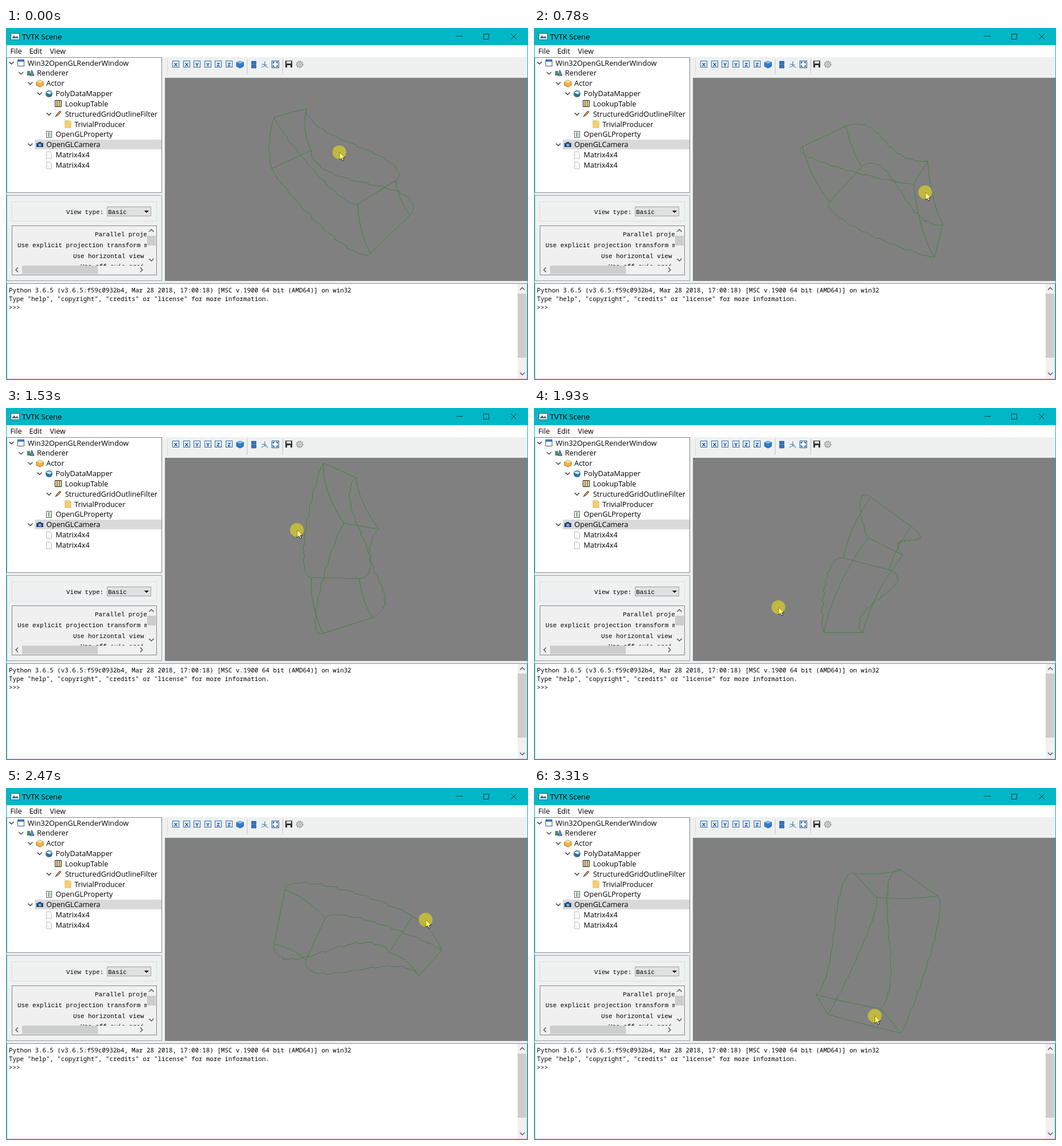
An HTML page that plays this animation: 910x615 px, repeating every 3390 ms.

```html
<!DOCTYPE html>
<html lang="en">
<head>
<meta charset="utf-8">
<title>TVTK Scene</title>
<style>
  html, body { margin: 0; width: 100%; height: 100%; overflow: hidden; background: #eff1f1; }
  svg { display: block; }
  text { font: 12.7px "Open Sans", "Noto Sans", sans-serif; white-space: pre; }
  .con { font: 10.82px "Noto Sans Mono", "DejaVu Sans Mono", monospace; }
  .form { font: 10.83px "Liberation Mono", monospace; }
  .line { fill: none; stroke: #333; }
  .arrow { fill: none; stroke: #505050; stroke-width: 1.4; }
</style>
</head>
<body>
<svg width="910" height="615" viewBox="0 0 910 615">
  <defs>
    <clipPath id="formClip"><rect x="11" y="346" width="234" height="69"/></clipPath>
    <clipPath id="viewClip"><rect x="277" y="87" width="632" height="355"/></clipPath>
  </defs>

  <!-- title bar and menu -->
  <rect width="910" height="615" fill="#eff1f1"/>
  <rect width="910" height="30" fill="#00b7c6"/>
  <rect x="8.5" y="9.5" width="15" height="11" fill="#e8f4fa" stroke="#555"/>
  <path d="M10 18l4-5 3 3 2-2 3 4z" fill="#3a6d86"/>
  <text x="28" y="19.5" style="font-size:13px">TVTK Scene</text>
  <path class="line" d="M785 14.5h11M832.5 10.5h9v9h-9zM880 10l10 10M890 10l-10 10"/>
  <rect y="30" width="910" height="21" fill="#fff"/>
  <text x="7.5" y="45">File</text><text x="40.5" y="45">Edit</text><text x="76.5" y="45">View</text>

  <!-- tree -->
  <rect x="1.5" y="51.5" width="270" height="236" fill="#fff" stroke="#828790"/>
  <rect x="50" y="195" width="221" height="17" fill="#d9d9d9"/>
  <g id="tree"></g>

  <!-- form -->
  <rect x="1.5" y="292.5" width="270" height="149" fill="none" stroke="#9a9ea4"/>
  <rect x="10.5" y="303.5" width="252" height="34" fill="none" stroke="#dcdfdf"/>
  <text class="form" x="105" y="325">View type:</text>
  <rect x="176.5" y="312.5" width="76" height="16" fill="#e1e1e1" stroke="#a0a0a0"/>
  <text class="form" x="178" y="325">Basic</text>
  <path d="M241 319h8l-4 4z"/>
  <rect x="10.5" y="345.5" width="252" height="86" fill="#f0f0f0" stroke="#828790"/>
  <g clip-path="url(#formClip)">
    <text class="form" x="155" y="364">Parallel projection</text>
    <text class="form" x="20" y="383">Use explicit projection transform matrix</text>
    <text class="form" x="117" y="402">Use horizontal view</text>
    <text class="form" x="130" y="420">Use off axis proj</text>
  </g>
  <rect x="246" y="363" width="15" height="17" fill="#cdcdcd"/>
  <rect x="28" y="415" width="132" height="15" fill="#cdcdcd"/>
  <path class="arrow" d="M249.5 356l4-4 4 4M249.5 403l4 4 4-4M21 418.5l-4 4 4 4M234 418.5l4 4-4 4"/>

  <!-- tool bar and scene -->
  <path d="M281.5 55v29" stroke="#b0b0b0" stroke-dasharray="1 2"/>
  <path d="M420.5 54v28M482.5 54v28" stroke="#c4c7c7"/>
  <g id="tools"></g>
  <path d="M402 60l6-2 6 2v7l-6 3-6-3z" fill="#2f7fd0" stroke="#1d4f8e"/>
  <path d="M402 60l6 2 6-2-6-2z" fill="#8cc2f2"/>
  <path d="M428 58h8v5h-8zM428 64h8v6h-8z" fill="#2f74c4" stroke="#1f4f8c" stroke-width=".7"/>
  <path fill="none" stroke="#3a6ea5" d="M451 58v8M451 66l-6 3M451 66l6 3M446 63l9 2"/>
  <rect x="463.5" y="57.5" width="12" height="12" fill="#fff" stroke="#1d4f80"/>
  <path d="M465 59h4l-4 4zM474 59v4l-4-4zM465 68v-4l4 4zM474 68h-4l4-4z" fill="#1d5f9c"/>
  <rect x="487" y="57" width="12" height="12" fill="#333"/>
  <path d="M489 58h8v4h-8zM490 65h6v4h-6z" fill="#e8e8e8"/>
  <circle cx="512" cy="63.5" r="5.3" fill="none" stroke="#999" stroke-width="2" stroke-dasharray="2.4 1.1"/>
  <circle cx="512" cy="63.5" r="4" fill="#eee" stroke="#999"/>
  <circle cx="512" cy="63.5" r="1.6" fill="none" stroke="#888"/>
  <rect x="277" y="87" width="632" height="355" fill="#808080"/>
  <g clip-path="url(#viewClip)">
    <path id="wire" fill="none" stroke="#457f45"/>
    <g id="cursor">
      <path d="M.5 0v13l3-2.8 2.2 5 2.3-1-2.2-4.8h4.2z" fill="#fff" stroke="#111" stroke-width=".9"/>
      <circle r="12" fill="#fff000" fill-opacity=".5"/>
    </g>
  </g>

  <!-- console -->
  <rect x="1.5" y="446.5" width="907" height="167" fill="#fff" stroke="#828790"/>
  <text class="con" x="5" y="461.5">Python 3.6.5 (v3.6.5:f59c0932b4, Mar 28 2018, 17:00:18) [MSC v.1900 64 bit (AMD64)] on win32</text>
  <text class="con" x="5" y="476.5">Type "help", "copyright", "credits" or "license" for more information.</text>
  <text class="con" x="5" y="491.5">&gt;&gt;&gt;</text>
  <rect x="892" y="447" width="16" height="166" fill="#f0f0f0"/>
  <rect x="892" y="464" width="15" height="112" fill="#cdcdcd"/>
  <path class="arrow" d="M896 457.5l4-4 4 4M896 602l4 4 4-4"/>
  <path d="M.5 30v584.5h909V30" fill="none" stroke="#00b7c6"/>
</svg>

<script>
const $ = id => document.getElementById(id);

// ---- tree ----
const icons = {
  window: '<path d="M-5.5-5.5h11v11h-11z" fill="#fff" stroke="#456"/><path d="M-5-5h10v3h-10z" fill="#3b8ad0"/>',
  render: '<path d="M-6-4h5v8h-5z" fill="#4d8a5b"/><path d="M-1 4l3-9 4 9z" fill="#5aa0dc" stroke="#235"/>',
  actor: '<path d="M-6-3l6-3 6 3v6l-6 3-6-3z" fill="#f0b445" stroke="#a9701c"/><path d="M-6-3l6 2 6-2-6-3z" fill="#fbe0a0"/>',
  mapper: '<circle r="6" fill="#2c6ea0"/><path d="M-5-2q5-5 10 0l-4 3z" fill="#cfe8f5"/>',
  table: '<path d="M-5.5-5.5h11v11h-11z" fill="#f6dfa0" stroke="#222"/><path d="M-2-5v10M2-5v10" stroke="#222"/>',
  filter: '<path d="M-5 5l3-5 5-5 2 2-5 5z" fill="#d9973a" stroke="#444"/>',
  folder: '<path d="M-5-6h7l3 2v10h-10z" fill="#f5cf73" stroke="#e0b04a"/>',
  prop: '<path d="M-4.5-5.5h9v11h-9z" fill="#fff" stroke="#555"/><path d="M-2-3h5M-2 0h5M-2 3h5M-1-3v6" stroke="#3b8a4a"/>',
  camera: '<path d="M-6-3h3l1-2h4l1 2h3v7h-12z" fill="#244a73"/><circle cy=".5" r="2.5" fill="#7fb2e0"/>',
  page: '<path d="M-4.5-6h6l3 3v9h-9z" fill="#fafafa" stroke="#bbb"/>'
};
// depth, label, icon, open
$('tree').innerHTML = [
  [0, 'Win32OpenGLRenderWindow', 'window', true], [1, 'Renderer', 'render', true],
  [2, 'Actor', 'actor', true], [3, 'PolyDataMapper', 'mapper', true],
  [4, 'LookupTable', 'table'], [4, 'StructuredGridOutlineFilter', 'filter', true],
  [5, 'TrivialProducer', 'folder'], [3, 'OpenGLProperty', 'prop'],
  [2, 'OpenGLCamera', 'camera', true], [3, 'Matrix4x4', 'page'], [3, 'Matrix4x4', 'page']
].map(([depth, label, icon, open], i) => {
  const x = 37.7 + depth * 16.3, y = 61 + i * 17.85;
  return `<text x="${x}" y="${y + 4.5}">${label}</text>` +
    `<g transform="translate(${Math.round(x - 11.5)} ${Math.round(y)})">${icons[icon]}</g>` +
    (open ? `<path class="line" stroke-width="1.3" d="M${x - 32} ${y - 2}l4 4 4-4"/>` : '');
}).join('');

$('tools').innerHTML = [...'XXYYZZ'].map((c, i) => {
  const x = Math.round(296 + i * 18.6);
  return `<rect x="${x - 5.5}" y="57.5" width="11" height="11" fill="#e6f0fa" stroke="#2b6aa8"/>` +
    `<text x="${x}" y="67" text-anchor="middle" style="font-size:9.5px;font-weight:bold" fill="#174a80">${c}</text>`;
}).join('');

// ---- vectors ----
const mix = (a, b, t) => a + (b - a) * t;
const dot = (a, b) => a[0] * b[0] + a[1] * b[1] + a[2] * b[2];
const unit = a => a.map(v => v / Math.hypot(...a));
const cross = (a, b) => [a[1] * b[2] - a[2] * b[1], a[2] * b[0] - a[0] * b[2], a[0] * b[1] - a[1] * b[0]];

// First two rows of the rotation: spin about the long axis, tilt in depth, roll on screen
function axes(roll, tilt, spin) {
  const [cr, ct, cs] = [roll, tilt, spin].map(d => Math.cos(d * Math.PI / 180));
  const [sr, st, ss] = [roll, tilt, spin].map(d => Math.sin(d * Math.PI / 180));
  return [
    [cr * ct, -cr * st * ss - sr * cs, -cr * st * cs + sr * ss],
    [sr * ct, -sr * st * ss + cr * cs, -sr * st * cs - cr * ss]
  ];
}

// Blends two poses and makes the rows square again
function blend(p, q, t) {
  const [a, b] = [0, 1].map(k => unit(p[k].map((v, i) => mix(v, q[k][i], t))));
  const s = unit(a.map((v, i) => v + b[i])), d = unit(a.map((v, i) => v - b[i]));
  const x = unit(s.map((v, i) => v + d[i])), y = unit(s.map((v, i) => v - d[i]));
  return [x, y, cross(x, y)];
}

// ---- the solid: a sector of a ring between two wavy walls ----
const HALF_ANGLE = .193, CAMERA = 660;

// e: wide end to narrow end, th: side to side, o: inner to outer wall, h: bulge
function solid(e, th, o, h = 0) {
  const mid = mix(319, 398, e), r = mid + mix(49, 28.5, e) * (2 * o - 1) + 77 * h;
  const a = HALF_ANGLE * (2 * th - 1);
  return [
    mix(108, -130, e) + (o - .5) * mix(7.5, -21, e),
    r * Math.cos(a) - mid * Math.cos(HALF_ANGLE) + mix(-3.5, 10.5, e),
    r * Math.sin(a)
  ];
}

// Bulge of the inner (0) and outer (1) wall, with small saw steps
function bulge(o, u) {
  const saw = u > .1 && u < .95 ? .045 * ((u * 8 + o * .4) % 1 - .5) : 0;
  const wave = o ? .57 * u ** .4 * (1 - u) ** .8 : -2.5 * u ** .6 * (.57 - u) * (1 - u) ** .7;
  return wave + saw;
}

function wirePath(rot) {
  const place = (...at) => {
    const p = solid(...at), k = CAMERA / (CAMERA + dot(rot[2], p));
    return `${(593.5 + k * dot(rot[0], p)).toFixed(1)} ${(264 + k * dot(rot[1], p)).toFixed(1)}`;
  };
  const curve = (n, f) => 'M' + Array.from({ length: n + 1 }, (_, i) => f(i / n)).join('L');
  let d = '';
  for (const a of [0, 1]) for (const b of [0, 1]) {
    d += curve(1, s => place(a, b, s));
    d += curve(16, s => place(a, s, b));
    d += curve(80, s => place(s * s, a, b, bulge(b, s * s)));
  }
  return d;
}

// ---- motion: step, pointer x and y, roll, tilt, spin ----
const keys = [
  [0, 581, 217, 44.2, 31.5, 18.4],
  [10, 682, 287, -157, 39.9, -145.8],
  [20, 507, 213, 99.2, 41.3, -18.2],
  [25, 426, 348, -83.7, 66.8, -161.9],
  [32, 731.5, 230, -165.5, 31.9, 10.9],
  [38, 376, 202, 3.9, 40.1, -110.5],
  [43, 594, 398, -71.2, 17.7, 48.9]
].map(([step, x, y, ...turn]) => ({ step, x, y, pose: axes(...turn) }));

// Catmull-Rom between b and c
const spline = (a, b, c, d, t) =>
  b + t / 2 * (c - a + t * (2 * a - 5 * b + 4 * c - d + t * (3 * (b - c) + d - a)));

const LOOP = 3390, STEPS = 44;
let shown = -1;
function draw(now) {
  const step = Math.min(STEPS - 1, Math.floor((now % LOOP + 11) / (LOOP / STEPS)));
  if (step !== shown) {
    shown = step;
    const i = Math.min(keys.findLastIndex(k => k.step <= step), keys.length - 2);
    const b = keys[i], c = keys[i + 1], a = keys[i - 1] || b, d = keys[i + 2] || c;
    const t = (step - b.step) / (c.step - b.step);
    const [x, y] = ['x', 'y'].map(k => spline(a[k], b[k], c[k], d[k], t).toFixed(1));
    $('wire').setAttribute('d', wirePath(blend(b.pose, c.pose, t)));
    $('cursor').setAttribute('transform', `translate(${x} ${y})`);
  }
  requestAnimationFrame(draw);
}
draw(performance.now());
</script>
</body>
</html>
```
